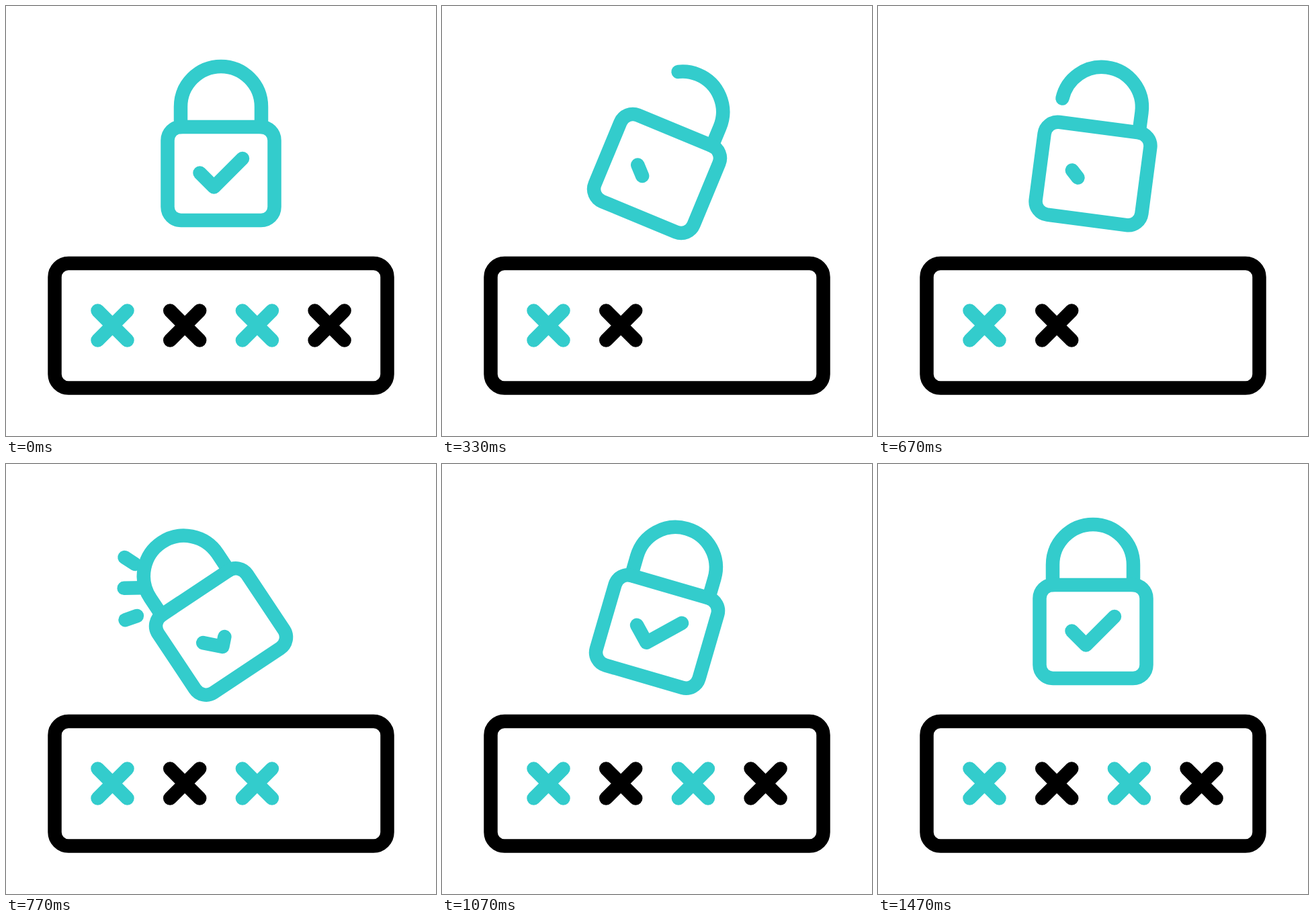
These frames come from a looping animation (640x640 px, 1670 ms). An HTML page:

```html
<!DOCTYPE html>
<html lang="en">
<head>
<meta charset="utf-8">
<title>Padlock</title>
<style>
  html, body { margin: 0; width: 100%; height: 100%; overflow: hidden; background: #fff; }
  svg { display: block; width: 100%; height: 100%; }
  .ink { fill: none; stroke-width: 20.5; stroke-linecap: round; stroke-linejoin: round; }
  .teal { stroke: #33cccc; }
  .dark { stroke: #000; }
</style>
</head>
<body>
<svg viewBox="0 0 640 640">
  <g class="ink">
    <rect class="dark" x="72.5" y="383" width="495" height="185.5" rx="20.5"/>
    <g id="crosses"></g>
    <g id="sparks" class="teal">
      <path pathLength="1" d="M192 149L152.5 123.5"/>
      <path pathLength="1" d="M202 184.2L135 185.9"/>
      <path pathLength="1" d="M195 226L150.7 241.6"/>
    </g>
    <g id="lock" class="teal">
      <path id="shackle" pathLength="1" d="M260 180V150A60 60 0 0 1 380 150V180"/>
      <rect x="240.5" y="180" width="159" height="139" rx="20"/>
      <path id="check" pathLength="1" d="M288.5 248.5L309.5 269.5L352 227"/>
    </g>
  </g>
</svg>
<script>
const LOOP = 1670;
const byId = id => document.getElementById(id);
const lock = byId('lock'), shackle = byId('shackle'), check = byId('check');
const sparks = [...byId('sparks').children];

// [step, value] at 30 steps per second, eased between
const angleKeys = [[4, 0], [16, 45], [25, -45], [32, 16.2], [38, -7.1], [44, 0]];
const openKeys = [[0, 0], [12, .409], [17, .409], [22, 0]];
const checkKeys = [[0, 1], [14, 0], [17, 0], [29, 1]];
const headKeys = [[20, 0], [27, 1]];
const tailKeys = [[24, 0], [31, 1]];

const crosses = [158.5, 266.2, 373.9, 481.6].map((x, i) => {
  const p = document.createElementNS('http://www.w3.org/2000/svg', 'path');
  p.setAttribute('class', i % 2 ? 'dark' : 'teal');
  p.setAttribute('d', `M${x - 22} 453.6l44 44m0 -44l-44 44`);
  byId('crosses').append(p);
  return p;
});

function at(keys, f) {
  if (f <= keys[0][0]) return keys[0][1];
  for (let i = 1; i < keys.length; i++) {
    const [a, va] = keys[i - 1], [b, vb] = keys[i];
    if (f <= b) {
      const u = (f - a) / (b - a);
      return va + (vb - va) * u * u * (3 - 2 * u);
    }
  }
  return keys[keys.length - 1][1];
}

function show(el, on) {
  el.style.visibility = on ? 'visible' : 'hidden';
}

function trim(el, from, to) {
  show(el, to - from > .001);
  el.style.strokeDasharray = `${to - from} 2`;
  el.style.strokeDashoffset = -from;
}

function draw(ms) {
  const f = Math.floor(ms * .03 + .15);
  lock.setAttribute('transform', `rotate(${at(angleKeys, f)} 320 249.5)`);
  trim(shackle, at(openKeys, f), 1);
  trim(check, 0, at(checkKeys, f));
  for (const s of sparks) trim(s, at(tailKeys, f), at(headKeys, f));
  // erased from the right, typed back from the left
  crosses.forEach((c, i) => show(c, f < 14 - 3 * i || f >= 17 + 3 * i));
}

const start = performance.now();
function tick() {
  draw((performance.now() - start) % LOOP);
  requestAnimationFrame(tick);
}
tick();
</script>
</body>
</html>
```
